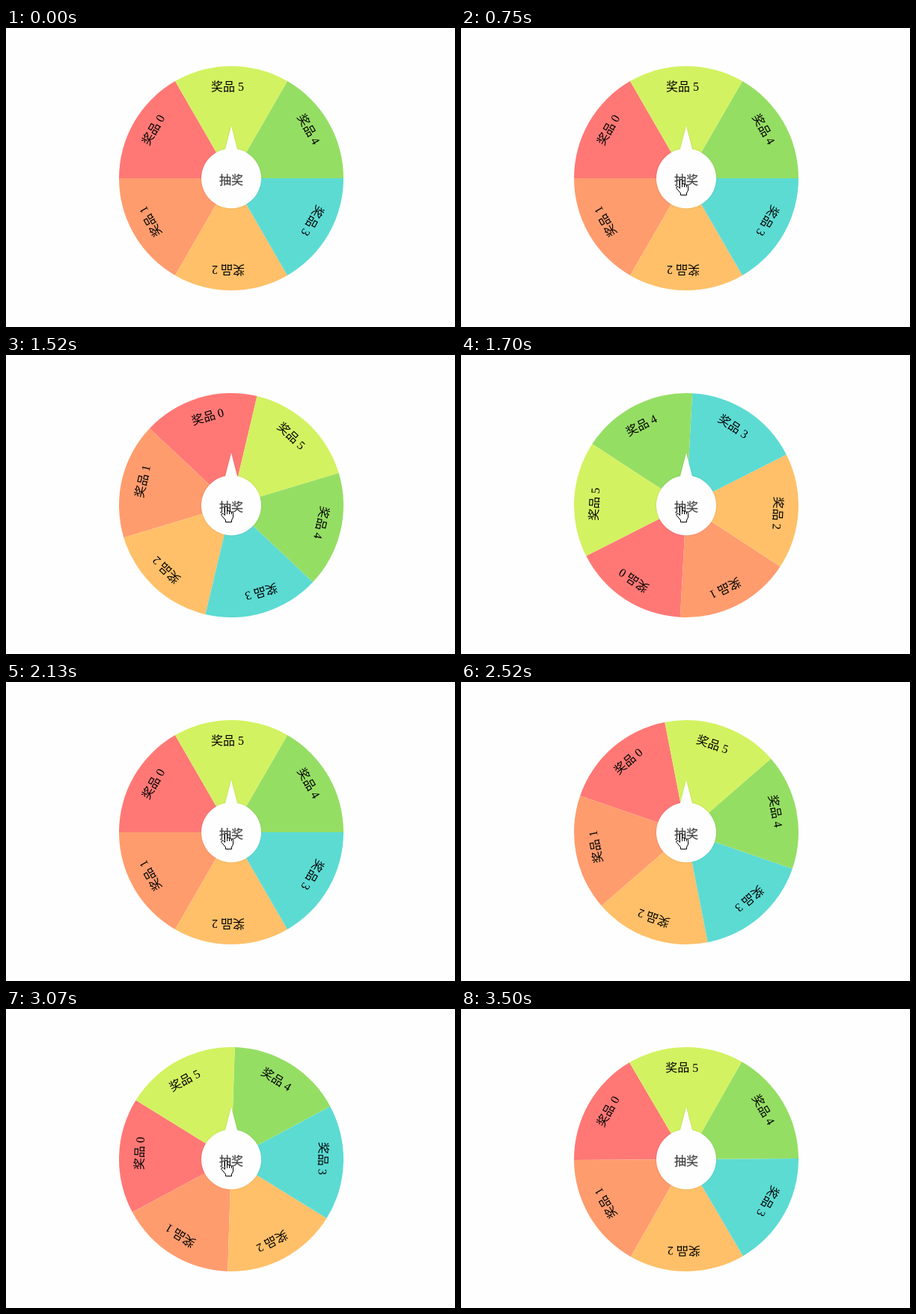
An HTML page that plays this animation: 600 by 400 pixels, repeating every 4.62 s.

```html
<!DOCTYPE html>
<html lang="zh-CN">
<head>
<meta charset="utf-8">
<title>抽奖</title>
<style>
  html, body { margin: 0; width: 100%; height: 100%; overflow: hidden; background: #fefefe; }
  svg { display: block; }
  text { font: 16px "Liberation Serif", "Noto Sans CJK SC", "Noto Sans CJK", serif; }
  #button { fill: #fefefe; filter: drop-shadow(0 0 1px rgba(0, 0, 0, .12)); }
  #label { fill: #444; stroke: #444; stroke-width: .25; }
  #cursor path { fill: #fff; stroke: #000; stroke-linejoin: round; }
</style>
</head>
<body>
<svg width="600" height="400">
  <g transform="translate(301 201)"><g id="wheel"></g></g>
  <path id="button" d="M301 131L309 162A40 40 0 1 1 293 162Z"/>
  <text id="label" x="285" y="209">抽奖</text>
  <g id="cursor">
    <path id="arrow" d="M.5 .5V16l3.6-3.4 2.6 6 2.4-1-2.6-5.8H11.5z"/>
    <path id="hand" transform="translate(-7 0)" d="M5.5 12.5V2a1.5 1.5 0 0 1 3 0V7.5q0-1.5 1.5-1.5t1.5 2q0-1 1.3-1t1.5 2q0-1 1-1t1.2 1.5V15l-2 4v2.5H6.5V19L1 12.5q-.8-2 1-2.5t3.5 2.5zM8.5 7V11M11.5 8V11M14.3 9V11"/>
  </g>
</svg>
<script>
const LOOP = 4620, TICK = 10;
const $ = id => document.getElementById(id);
const colors = ['#ff7875', '#ff9c6e', '#ffc069', '#5cdbd3', '#95de64', '#d3f261'];

$('wheel').innerHTML = colors.map((color, i) => `
  <g transform="rotate(${60 * (5 - i)})">
    <path fill="${color}" d="M0 0L-75 -129.9A150 150 0 0 1 75 -129.9Z"/>
    <text x="${i < 3 ? -18 : -27}" y="-117">奖品 ${i}</text>
  </g>`).join('');

const progress = (t, start, length) => Math.min(1, Math.max(0, (t - start) / length));
const smooth = u => u * u * (3 - 2 * u);

// Five turns: a quick start and a long slow-down
const spin = u => 1800 * (1 - (1 - u ** 1.6735) ** 3.388);

function draw() {
  const now = performance.now() % LOOP;
  const t = now - now % TICK;

  const angle = spin(progress(t, 1230, 900)) + spin(progress(t, 2486, 1068));
  $('wheel').setAttribute('transform', `rotate(${angle})`);

  const enter = smooth(progress(t, 170, 530));
  const leave = smooth(progress(t, 3070, 430));
  const x = 139 + 155 * enter - 54 * leave;
  const y = 385 - 183 * enter + 203 * leave;
  const over = Math.hypot(x - 301, y - 201) < 40;
  $('cursor').setAttribute('transform', `translate(${x} ${y})`);
  $('cursor').style.display = t >= 170 && t < 3500 ? '' : 'none';
  $('arrow').style.display = over ? 'none' : '';
  $('hand').style.display = over ? '' : 'none';
  requestAnimationFrame(draw);
}
draw();
</script>
</body>
</html>
```
